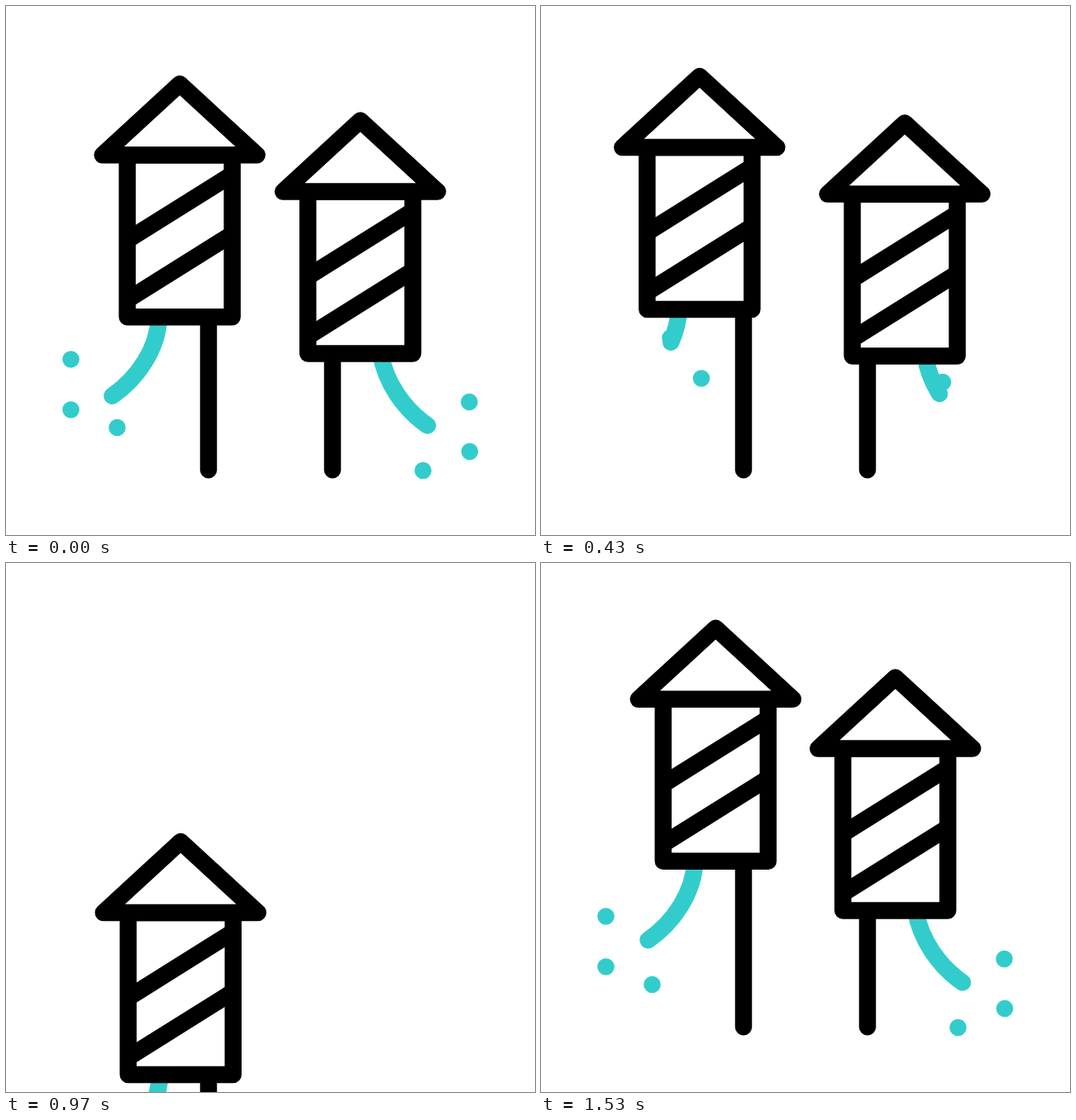
Recreate the animation shown at these times as an HTML page. Size 640 px wide and 640 px high, loop 1670 ms.

```html
<!DOCTYPE html>
<html lang="en">
<head>
<meta charset="utf-8">
<title>Firework rockets</title>
<style>
  html, body { margin: 0; width: 100%; height: 100%; overflow: hidden; background: #fff; }
  svg { display: block; width: 100vw; height: 100vh; }
  .ink { fill: none; stroke: #000; stroke-width: 20.5; stroke-linejoin: round; }
  .stick { stroke-linecap: round; }
  .shell { fill: #fff; }
  .trail { fill: none; stroke: #3cc; stroke-width: 20.5; stroke-linecap: round; }
  .dot { fill: #3cc; }
</style>
</head>
<body>
<svg id="stage" viewBox="0 0 640 640"></svg>
<script>
const LOOP = 1670, STEP = 100 / 3, STEPS = 50;
const EXIT_SPEED = 114, RETURN_SPEED = 48, EXIT_STEPS = 5.5; // px per step
const POSE_STEPS = [0, 8, 17, 23];
const stage = document.getElementById('stage');

const rockets = [
  {
    home: [147.8, 164.7],
    stick: 'M245 361V561.3',
    trail: 'M38.5 196C37 234 13 270-18.3 291.5',
    launch: 15.59, land: 34.38,
    light: 0, burnRate: .0494,
    poses: [[-1.1, 15.6], [-13.7, -4.2], [-24, 14.7], [0, 0]],
    bursts: [
      { start: 34, hold: 18, at: [[78.5, 427.5], [78.5, 488.5], [134.5, 510]] },
      { start: 6, hold: 5, at: [[115.5, 388.5], [185, 450]] },
      { start: 11, hold: 7, at: [[156.5, 401.5], [194, 450.5], [232, 428.5]] }
    ]
  },
  {
    home: [365.2, 224.5],
    stick: 'M395 421V561.3',
    trail: 'M88.2 196C93.5 231 117 264 144.8 283',
    launch: 20.46, land: 40.72,
    light: 5.5, burnRate: .072,
    poses: [[0, 0], [14.4, -.2], [9, 5.6], [0, 2.2]],
    bursts: [
      { start: 42, hold: 16, at: [[504.5, 562], [561, 539], [560.5, 479]] },
      { start: 13, hold: 6, at: [[486, 455], [477.5, 505], [454.5, 542]] }
    ]
  }
];

function add(parent, tag, attrs) {
  const el = document.createElementNS('http://www.w3.org/2000/svg', tag);
  for (const name in attrs) el.setAttribute(name, attrs[name]);
  return parent.appendChild(el);
}

const move = (el, x, y) => el.setAttribute('transform', `translate(${x} ${y})`);

// Fly out at the top, then come back in from below.
function lift(r, k) {
  return k < r.launch + EXIT_STEPS
    ? -EXIT_SPEED * Math.max(0, k - r.launch)
    : RETURN_SPEED * Math.max(0, r.land - k);
}

function sway(poses, k) {
  const i = POSE_STEPS.findIndex(s => k < s);
  if (i < 0) return poses[poses.length - 1];
  const u = (k - POSE_STEPS[i - 1]) / (POSE_STEPS[i] - POSE_STEPS[i - 1]);
  return poses[i].map((to, axis) => poses[i - 1][axis] * (1 - u) + to * u);
}

function burn(r, k) {
  return Math.min(1, Math.max(.145, 1 - (k - r.light) * r.burnRate));
}

// The dots of a burst pop on and off one after another, two steps apart.
function isLit(burst, i, k) {
  return (k - burst.start - 2 * i + 2 * STEPS) % STEPS < burst.hold;
}

for (const r of rockets) {
  for (const b of r.bursts) {
    b.dots = b.at.map(([cx, cy]) => add(stage, 'circle', { class: 'dot', cx, cy, r: 10.3 }));
  }
  r.group = add(stage, 'g');
  add(r.group, 'path', { class: 'ink stick', d: r.stick });
  r.body = add(r.group, 'g');
  r.fuse = add(r.body, 'path', { class: 'trail', d: r.trail, pathLength: 1 });
  add(r.body, 'path', { class: 'ink shell', d: 'M0 0H127V196H0Z' });
  add(r.body, 'path', { class: 'ink', d: 'M0 103L127 23.5M0 175.3L127 95.8' });
  add(r.body, 'path', { class: 'ink shell', d: 'M-30 0H157L63.5-86Z' });
}

function draw(k) {
  for (const r of rockets) {
    const back = k >= r.launch + EXIT_STEPS;
    const [dx, dy] = back ? [0, 0] : sway(r.poses, k);
    move(r.group, 0, lift(r, k));
    move(r.body, r.home[0] + dx, r.home[1] + dy);
    r.fuse.setAttribute('stroke-dasharray', `${back ? 1 : burn(r, k)} 2`);
    for (const b of r.bursts) {
      b.dots.forEach((dot, i) =>
        dot.setAttribute('visibility', isLit(b, i, k) ? 'visible' : 'hidden'));
    }
  }
}

function tick() {
  const t = performance.now() % LOOP;
  draw(Math.min(STEPS - 1, Math.floor((t + 4) / STEP)));
  requestAnimationFrame(tick);
}
tick();
</script>
</body>
</html>
```
